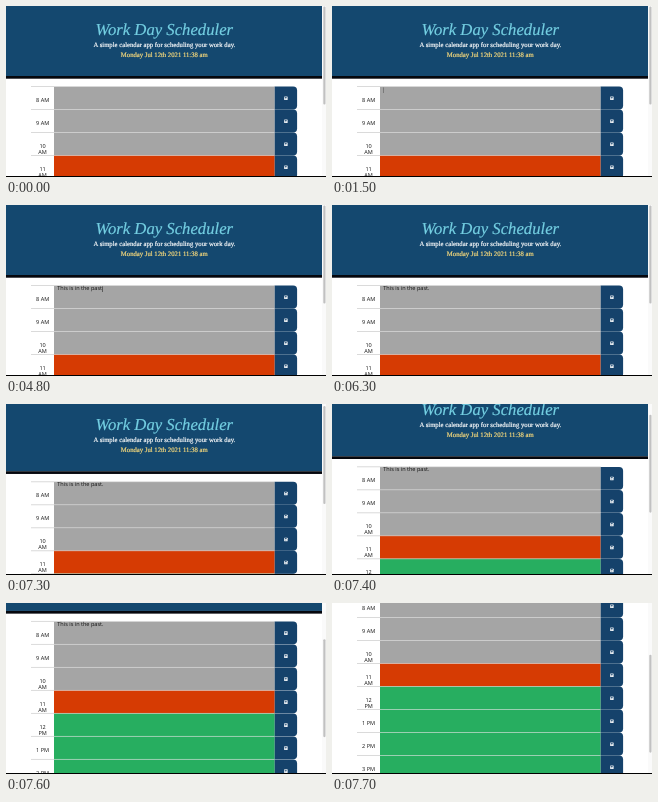
Recreate the animation shown at these times as an HTML page. Size 320 by 171 pixels, loop 8000 ms.

```html
<!DOCTYPE html>
<html lang="en">
<head>
<meta charset="utf-8">
<title>Work Day Scheduler</title>
<style>
  html, body { margin: 0; width: 100%; height: 100%; overflow: hidden; background: #fff; }
  svg { display: block; width: 320px; height: 171px; }
  text { text-rendering: geometricPrecision; white-space: pre; }
  .head { font-family: "Liberation Serif", "Times New Roman", serif; text-anchor: middle; stroke-width: 0.18px; }
  .title { font-size: 16.7px; font-style: italic; fill: #74cfe2; stroke: #74cfe2; }
  .lead { font-size: 6.7px; fill: #fff; stroke: #fff; }
  .date { font-size: 6.7px; fill: #fbdc7c; stroke: #fbdc7c; }
  .body { font-family: "Open Sans", "Noto Sans", sans-serif; font-size: 5.55px; fill: #111; }
  .hour { text-anchor: middle; }
</style>
</head>
<body>
<svg viewBox="0 0 320 171" xmlns="http://www.w3.org/2000/svg">
  <g id="page">
    <rect width="316" height="70" fill="#14486f"/>
    <rect y="70" width="316" height="2.7" fill="#05070d"/>
    <text class="head title" x="158.3" y="29">Work Day Scheduler</text>
    <text class="head lead" x="158.4" y="40.8">A simple calendar app for scheduling your work day.</text>
    <text class="head date" x="158.3" y="50.8">Monday Jul 12th 2021 11:38 am</text>
    <g id="rows"></g>
    <text id="note" class="body" x="51.3" y="85.1"></text>
    <rect id="caret" y="81.4" width="0.5" height="5.6" fill="#111"/>
  </g>
  <rect x="316" width="4" height="171" fill="#fafafa"/>
  <rect id="thumb" x="317.3" y="0.5" width="2.2" height="98" rx="1.1" fill="#c1c1c1"/>
  <rect y="170" width="320" height="1" fill="#000"/>
</svg>
<script>
const LOOP = 8000, KEY = 100, FOCUS = 1100, BLINK = 500;
const TOP = 80.5, ROW = 23, LEFT = 48, RIGHT = 268.7, BLUE = "#15426b";
const bursts = [
  { at: 1900, text: "This " },
  { at: 2500, text: "is " },
  { at: 3300, text: "in the " },
  { at: 4400, text: "past" },
  { at: 5400, text: "." }
];
const $ = id => document.getElementById(id);
const note = $("note"), caret = $("caret");

function add(tag, attrs, text = "") {
  const el = document.createElementNS("http://www.w3.org/2000/svg", tag);
  for (const k in attrs) el.setAttribute(k, attrs[k]);
  el.textContent = text;
  $("rows").append(el);
}

function addRow(hour) {
  const y = TOP + (hour - 8) * ROW;
  const fill = hour < 11 ? "#a5a5a5" : hour === 11 ? "#d63b03" : "#27ae60";
  const label = `${(hour - 1) % 12 + 1} ${hour < 12 ? "AM" : "PM"}`;
  const lines = label.length > 4 ? label.split(" ") : [label];
  lines.forEach((s, n) =>
    add("text", { class: "body hour", x: 36.6, y: y + 15.7 + n * 5.8 }, s));
  add("rect", { x: LEFT, y, width: RIGHT - LEFT, height: ROW, fill });
  add("path", { d: `M25 ${y}H${LEFT}`, stroke: "#b4b4b4", "stroke-width": 0.5 });
  add("path", { d: `M${LEFT} ${y}H${RIGHT}`, stroke: "#ddd", "stroke-width": 0.5 });
  add("path", { d: `M${RIGHT} ${y + 0.1}h18.4q4 0 4 4v14.8q0 4-4 4h-18.4z`, fill: BLUE });
  // save icon
  add("rect", { x: 278.2, y: y + 9.9, width: 3.4, height: 3.6, rx: 0.5, fill: "#fff" });
  add("rect", { x: 278.8, y: y + 10.4, width: 1.9, height: 0.9, fill: BLUE });
  add("circle", { cx: 279.9, cy: y + 12.3, r: 0.5, fill: BLUE });
}
for (let hour = 8; hour <= 17; hour++) addRow(hour);

// Text typed so far, one letter per KEY, and the time of the last key press
function typing(t) {
  let text = "", last = FOCUS;
  for (const b of bursts) {
    const n = Math.min(b.text.length, Math.floor((t - b.at) / KEY) + 1);
    if (n < 1) break;
    text += b.text.slice(0, n);
    last = b.at + (n - 1) * KEY;
  }
  return { text, idle: t - last };
}

function caretOpacity(idle) {
  if (idle < 0 || idle >= BLINK) return 0;
  return idle < BLINK - KEY ? 1 : 0.6;
}

// Accelerating scroll in steps of 100 ms
function scrollAt(t) {
  const step = Math.floor(t / 100) * 100;
  const u = Math.min(1, Math.max(0, (step - 7265) / 435));
  return 89 * u ** 1.38;
}

function draw() {
  const t = performance.now() % LOOP;
  const { text, idle } = typing(t);
  const y = scrollAt(t);
  note.textContent = text;
  caret.setAttribute("x", 51.3 + note.getComputedTextLength());
  caret.setAttribute("opacity", caretOpacity(idle));
  $("page").setAttribute("transform", `translate(0 ${-y})`);
  $("thumb").setAttribute("transform", `translate(0 ${y * 0.575})`);
  requestAnimationFrame(draw);
}
draw();
</script>
</body>
</html>
```
